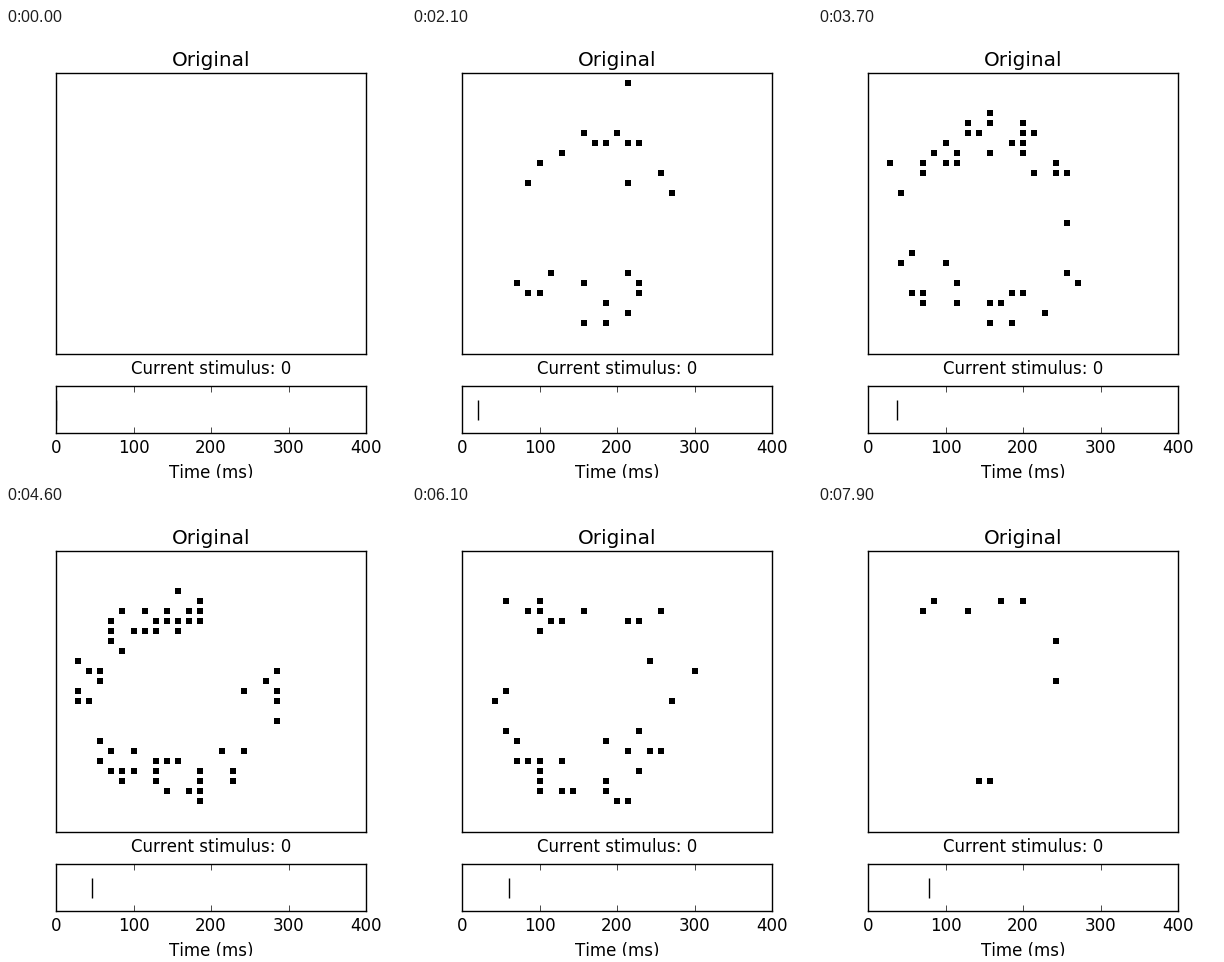
These frames come from a looping animation (400x450 px, 8 s). A matplotlib script:

```python
import numpy as np
import matplotlib.pyplot as plt
from matplotlib.animation import FuncAnimation

FRAMES, STEP = 80, 100
W, H, DPI = 400, 450, 100
GRID = 28

plt.rcParams.update({
    "font.family": "DejaVu Sans", "font.size": 12, "axes.linewidth": 1.0,
    "text.kerning_factor": 6,
    "xtick.direction": "in", "ytick.direction": "in",
})

COL, ROW = (g.ravel() for g in np.meshgrid(np.arange(1, GRID),
                                           np.arange(1, GRID)))


def spikes(t):
    """Random cells of a ring that swells with activity and drifts upward."""
    rng = np.random.default_rng(t)
    count = int(np.interp(t, [0, 12, 46, 54, 79], [0, 16, 56, 48, 9]))
    if 0 < t < FRAMES - 1:
        count = max(1, count + rng.integers(-2, 3))

    # Horizontal edges fire most; the sides wake up later
    dx = (COL - 11) / 10
    dy = (ROW - np.interp(t, [40, 79], [15, 14])) / 10.3
    r = np.hypot(dx, dy) + 1e-9
    sides = np.interp(t, [0, 79], [0.05, 0.5])
    weight = np.exp(-((r - 0.82) / 0.18) ** 2) * (sides + (dy / r) ** 2)
    weight[(COL > 21) | (ROW < 4) | (ROW > 25)] = 0
    weight += 0.002  # stray noise anywhere on the grid

    pick = rng.choice(COL.size, count, replace=False, p=weight / weight.sum())
    return COL[pick], ROW[pick]


fig = plt.figure(figsize=(W / DPI, H / DPI), dpi=DPI, facecolor="white")


def panel(top, bottom):
    return fig.add_axes([50 / W, 1 - bottom / H, 310 / W, (bottom - top) / H])


def label(text, x, baseline, size=12):
    fig.text(x / W, 1 - baseline / H, text, fontsize=size,
             ha="center", va="baseline")


field = panel(45, 325.52)
field.set(xlim=(0, GRID), ylim=(GRID, 0), xticks=[], yticks=[])
dots, = field.plot([], [], "ks", markersize=6 * 72 / DPI, markeredgewidth=0)

TOP, BOTTOM = 358.24, 405
strip = panel(TOP, BOTTOM)
strip.set(xlim=(0, 400), ylim=(BOTTOM, TOP), yticks=[],
          xticks=range(0, 401, 100))
strip.tick_params(top=True, length=4, width=0.5, labelbottom=False)
cursor, = strip.plot([0, 0], [372, 392], color="black", lw=1,
                     solid_capstyle="butt")

label("Original", 205, 38, 14.4)
label("Current stimulus: 0", 205, 346)
label("Time (ms)", 205, 450)
for ms in range(0, 401, 100):
    label(str(ms), 50 + 0.775 * ms, 425)


def update(t):
    dots.set_data(*spikes(t))
    cursor.set_xdata([t, t])
    return dots, cursor


anim = FuncAnimation(fig, update, frames=FRAMES, interval=STEP,
                     repeat=True, repeat_delay=0)
plt.show()
```
